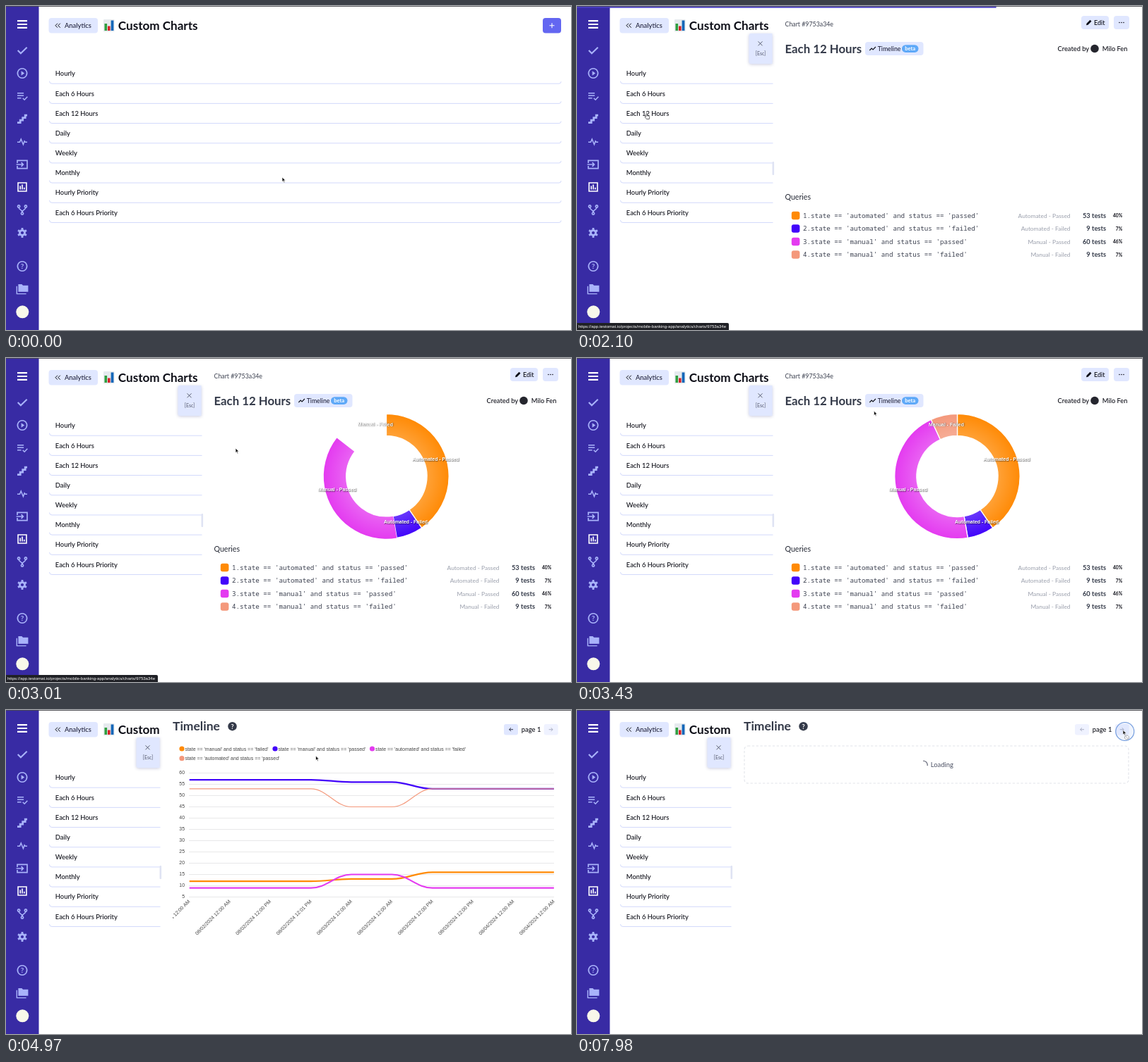
Write an HTML page with a canvas that moves like this. It is 800x460 px and loops after 8 s.

```html
<!DOCTYPE html>
<html lang="en">
<head>
<meta charset="utf-8">
<title>Custom Charts</title>
<style>
html, body { margin: 0; width: 100%; height: 100%; overflow: hidden; background: #fff; }
canvas { display: block; width: 800px; height: 460px; }
</style>
</head>
<body>
<canvas id="stage"></canvas>
<script>
const W = 800, H = 460, LOOP = 8000;
const canvas = document.getElementById('stage');
const ctx = canvas.getContext('2d');
const dpr = window.devicePixelRatio || 1;
canvas.width = W * dpr;
canvas.height = H * dpr;

const UI = 'Lato, "Open Sans", sans-serif';
const ARIAL = '"Liberation Sans", Arial, sans-serif';
const MONO = '"Noto Sans Mono", "DejaVu Sans Mono", monospace';
const INK = '#0e0f18', SLATE = '#343a49', PALE = '#e0e7ff', SIDE = '#382ba4', ICON = '#a9b3fa';
const ORANGE = '#ff8a05', BLUE = '#4205fa', PINK = '#e43bf0', SALMON = '#f4987b';

const clamp = v => Math.max(0, Math.min(1, v));
const span = (t, a, b) => clamp((t - a) / (b - a));
const smooth = p => p * p * (3 - 2 * p);
const outQuart = p => 1 - (1 - p) ** 4;
const mix = (a, b, p) => a + (b - a) * p;

// y is the middle of the capitals
function text(s, x, y, size, color = INK, { font = UI, weight = 400, align = 'left' } = {}) {
  ctx.font = `${weight} ${size}px ${font}`;
  ctx.textAlign = align;
  ctx.fillStyle = color;
  ctx.fillText(s, x, y + size * 0.36);
}
function box(x, y, w, h, r, fill) {
  ctx.beginPath();
  ctx.roundRect(x, y, w, h, r);
  ctx.fillStyle = fill;
  ctx.fill();
}
function disc(x, y, r, fill) {
  ctx.beginPath();
  ctx.arc(x, y, r, 0, 7);
  ctx.fillStyle = fill;
  ctx.fill();
}
function stroke(d, x, y, scale, color, width, fill) {
  const path = new Path2D(d);
  ctx.save();
  ctx.translate(x, y);
  ctx.scale(scale, scale);
  if (fill) { ctx.fillStyle = fill; ctx.fill(path); }
  if (width) {
    ctx.strokeStyle = color;
    ctx.lineWidth = width;
    ctx.stroke(path);
  }
  ctx.restore();
}
const icon = (d, y, color, width, fill) => stroke(d, 23 - 8.4, y - 8.4, 0.7, color, width, fill);

// ---- sidebar ----
const RING = 'M12 2.5a9.5 9.5 0 1 0 .01 0z';
const ICONS = [
  ['M2 5h20M2 12h20M2 19h20', 26, 3, '#fff'],
  ['M3 12l6 6L21.5 6', 63, 3],
  [RING, 95.5, 2.2],
  ['M2 6h13M2 11h13M2 16h8M13 16l3.5 3.5L22.5 13', 128, 2.2],
  ['M2 20h6v-5h5v-5h5V5h4', 160, 4],
  ['M2 13h5l2.5-6 4.5 11 2.5-7 1.5 2h4', 192.5, 2.2],
  ['M2 9V4h20v16H2v-5M0 12h14M10 8l4 4-4 4', 225, 2.4],
  ['M3.5 3.5h17v17h-17zM8 10v7M12 7v10M16 13v4', 257, 2.3, '#fff'],
  ['M5 2.5a2.3 2.3 0 1 0 .01 0zM19 2.5a2.3 2.3 0 1 0 .01 0zM12 17a2.3 2.3 0 1 0 .01 0z' +
   'M5 7c0 5 7 4 7 10M19 7c0 5-7 4-7 10', 289.5, 2.3],
  ['M12 7a5 5 0 1 0 .01 0zM12 2v4M12 18v4M3.5 7l3 1.8M17.5 15.2l3 1.8M3.5 17l3-1.8M17.5 8.8l3-1.8', 322, 4],
  [RING, 369.5, 2.2]
];
function sidebar() {
  ctx.fillStyle = SIDE;
  ctx.fillRect(0, 0, 46.5, H);
  for (const [d, y, width, color] of ICONS) icon(d, y, color || ICON, width);
  icon('M10 7.5l6.5 4.5-6.5 4.5z', 95.5, ICON, 0, ICON);
  icon('M4 2h7l2.5 2.5H24V17.5H4z', 402, ICON, 0, ICON);
  icon('M1 6v15.5h19', 402, ICON, 2);
  text('?', 23, 369.5, 10, ICON, { weight: 700, align: 'center' });
  disc(23.3, 434.3, 9, '#f8f8ea');
}

// ---- list page ----
const ROWS = ['Hourly', 'Each 6 Hours', 'Each 12 Hours', 'Daily', 'Weekly', 'Monthly',
  'Hourly Priority', 'Each 6 Hours Priority'];
function listPage() {
  box(60.5, 17, 69.5, 21.5, 4, PALE);
  stroke('M3.5 0L.5 3l3 3M7.3 0l-3 3 3 3', 69.5, 24.7, 1, INK, 1);
  text('Analytics', 83, 27.6, 9.4, '#20223a', { weight: 500 });

  box(138, 19, 15.5, 17.5, 1, '#e6eaee');
  box(139.5, 25, 3.6, 10, 0, '#2f9e3f');
  box(144, 28.5, 3.6, 6.5, 0, '#d8232a');
  box(148.6, 20.5, 3.8, 14.5, 0, '#1467b8');
  text('Custom Charts', 158.8, 27.6, 17.1, INK, { weight: 700 });

  box(760, 17, 26, 21.5, 4, '#6366f1');
  stroke('M0 3.5h7M3.5 0v7', 769.5, 24.2, 1, '#fff', 1.1);

  ROWS.forEach((name, i) => {
    const y = 96 + i * 28.18;
    text(name, 69.8, y, 9.4, INK, { weight: 500 });
    stroke('M61.5 -3.5q0 3.5 3.5 3.5H783q3 0 3-3', 0, y + 14.2, 1, '#cdd5fb', 0.9);
  });
}

// ---- side panels ----
function openPanel(x, slide, draw) {
  if (slide <= 0) return;
  const dx = (W + 36 - x) * (1 - slide);
  ctx.save();
  ctx.translate(dx, 0);
  ctx.fillStyle = '#fff';
  ctx.fillRect(x, 1, W - x, H);
  ctx.save();
  ctx.shadowColor = 'rgba(60,70,140,.28)';
  ctx.shadowBlur = 4 * dpr;
  ctx.shadowOffsetY = dpr;
  box(x - 34, 39, 33, 43, [3, 0, 0, 3], PALE);
  ctx.restore();
  stroke('M0 0l6 6M6 0l-6 6', x - 21, 50.3, 1, '#4b5063', 0.9);
  text('[Esc]', x - 17.5, 67.3, 7, '#565b6e', { align: 'center' });
  box(x - 1, 221, 2.6, 19, 1, '#dfe3f3');
  draw();
  ctx.restore();
}

const QUERIES = [
  ['Automated', 'Passed', 53, 40, ORANGE],
  ['Automated', 'Failed', 9, 7, BLUE],
  ['Manual', 'Passed', 60, 46, PINK],
  ['Manual', 'Failed', 9, 7, SALMON]
];
const SPOTS = [[608.5, 144], [566, 233], [469, 187], [523, 94.3]];

function donut(t) {
  const cx = 538.5, cy = 168, inner = 57.5, outer = 88.7;
  const sweep = 360 * span(t, 2303, 3131);
  if (!sweep) return;
  let from = 0;
  for (const [, , count, , color] of QUERIES) {
    const to = from + count / 131 * 360;
    const end = Math.min(to, sweep);
    if (end > from) {
      const a = (from - 90) * Math.PI / 180, b = (end - 90) * Math.PI / 180;
      ctx.beginPath();
      ctx.arc(cx, cy, outer, a, b);
      ctx.arc(cx, cy, inner, b, a, true);
      ctx.closePath();
      ctx.fillStyle = color;
      ctx.fill();
      const shade = ctx.createRadialGradient(cx, cy, inner, cx, cy, outer);
      shade.addColorStop(0, 'rgba(255,255,255,.2)');
      shade.addColorStop(1, 'rgba(255,255,255,0)');
      ctx.fillStyle = shade;
      ctx.fill();
      // a slice gets its white border once it is complete
      if (end === to) {
        ctx.strokeStyle = '#fff';
        ctx.lineWidth = 1.3;
        ctx.stroke();
      }
    }
    from = to;
  }
  ctx.save();
  ctx.shadowColor = 'rgba(0,0,0,.65)';
  ctx.shadowBlur = 1.3 * dpr;
  ctx.shadowOffsetX = ctx.shadowOffsetY = 0.7 * dpr;
  QUERIES.forEach(([kind, state], i) =>
    text(`${kind} - ${state}`, ...SPOTS[i], 6.9, '#fff', { font: ARIAL, weight: 700, align: 'center' }));
  ctx.restore();
}

function detail(t) {
  text('Chart #9753a34e', 294.5, 26.3, 8.8, '#3c4150');
  box(714, 14, 39, 19, 4, PALE);
  stroke('M0 8l.6-2.6L5.5.5 7.5 2.5 2.6 7.4z', 721, 19.3, 1, INK, 0, INK);
  text('Edit', 732, 23.5, 9, INK, { weight: 500 });
  box(760, 14, 22, 19, 4, PALE);
  for (const x of [768, 771, 774]) disc(x, 23.5, 0.8, INK);

  text('Each 12 Hours', 294.5, 60.6, 16.8, SLATE, { weight: 700 });
  box(408, 51, 82.5, 19, 4, t > 3440 && t < 4480 ? '#c7d2fe' : PALE);
  stroke('M0 6l2.8-3 2 2L8.600 1', 414.3, 57, 1, INK, 1.1);
  text('Timeline', 425.7, 60.6, 8.7, '#20223a', { weight: 500 });
  box(460, 55.3, 23.5, 10.6, 5.3, '#5ea9f8');
  text('beta', 471.7, 60.4, 7.6, '#fff', { weight: 700, align: 'center' });
  text('Created by', 680.5, 60.5, 9.3, INK, { weight: 500 });
  disc(733, 60.5, 5.8, '#25262e');
  text('Milo Fen', 743.8, 60.5, 9.3, INK, { weight: 500 });

  donut(t);
  text('Queries', 294.5, 270.8, 10.6, '#262a36');
  QUERIES.forEach(([kind, state, count, share, color], i) => {
    const y = 297.5 + i * 18.5;
    box(303.8, y - 5.8, 11.6, 11.6, 3, color);
    text(`${i + 1}.state == '${kind.toLowerCase()}' and status == '${state.toLowerCase()}'`,
      320, y, 9.24, '#3c4150', { font: MONO });
    text(`${kind} - ${state}`, 698.5, y + 0.2, 8.4, '#9a9fac', { align: 'right' });
    text(`${count} tests`, 749, y, 9.3, SLATE, { weight: 700, align: 'right' });
    text(`${share}%`, 772.2, y + 0.5, 6.7, INK, { weight: 700, align: 'right' });
  });
}

// ---- timeline ----
const SERIES = [
  ['manual', 'failed', ORANGE, 249, 55, 2.2],
  ['manual', 'passed', BLUE, 381, 55, 2.2],
  ['automated', 'failed', PINK, 518.5, 55, 2.2],
  ['automated', 'passed', SALMON, 249, 68.7, 1.1]
];
// value per half day
const VALUES = {
  1: [[12, 12, 13, 16, 16], [57, 57, 56, 53, 53], [9, 9, 15, 9, 9], [53, 53, 45, 53, 53]],
  2: [[10, 10, 12, 12, 12], [55, 55, 57, 57, 57], [12, 12, 9, 9, 9], [50, 50, 53, 53, 53]]
};
const px = i => 259.7 + i * 57.35;
const py = v => 89.5 + (60 - v) * 3.2;

function stamp(i, page) {
  const slot = Math.floor(i / 2) - (page - 1) * 5;
  const d = new Date(2024, 7, 2, slot * 12);
  const two = n => String(n).padStart(2, '0');
  const minute = page === 1 && i === 3 ? '01' : '00';
  return `${two(d.getMonth() + 1)}/${two(d.getDate())}/2024 12:${minute} ${d.getHours() ? 'PM' : 'AM'}`;
}

function lineChart(page, rise) {
  for (const [kind, state, color, x, y] of SERIES) {
    disc(x, y, 3.6, color);
    text(`state == '${kind}' and status == '${state}'`, x + 4.4, y + 0.2, 6.97, '#444', { font: ARIAL });
  }
  for (let v = 5; v <= 60; v += 5) {
    ctx.fillStyle = '#e2e2e4';
    ctx.fillRect(259, py(v) - 0.4, 517, 0.8);
    text(v, 253, py(v) - 0.5, 6.9, '#444', { font: ARIAL, align: 'right' });
  }
  ctx.save();
  ctx.beginPath();
  ctx.rect(236, 0, W, H);
  ctx.clip();
  for (let i = 0; i < 10; i++) {
    ctx.save();
    ctx.translate(px(i) - 0.5, 270.5);
    ctx.rotate(-Math.PI / 4);
    text(stamp(i, page), 0, 0, 7.05, '#444', { font: ARIAL, align: 'right' });
    ctx.restore();
  }
  ctx.restore();

  SERIES.forEach(([, , color, , , width], s) => {
    const y = i => mix(py(5), py(VALUES[page][s][Math.floor(i / 2)]), rise);
    ctx.beginPath();
    ctx.moveTo(px(0), y(0));
    for (let i = 1; i < 10; i++)
      ctx.bezierCurveTo(px(i - 0.6), y(i - 1), px(i - 0.4), y(i), px(i), y(i));
    ctx.strokeStyle = color;
    ctx.lineWidth = width;
    ctx.stroke();
  });
}

function loader(t) {
  ctx.beginPath();
  ctx.roundRect(237, 51, 544, 53, 5);
  ctx.setLineDash([3.4, 2.4]);
  ctx.strokeStyle = '#e2e4ea';
  ctx.lineWidth = 1.1;
  ctx.stroke();
  ctx.setLineDash([]);
  const a = (t - 7980) / 1000 * Math.PI * 2;
  ctx.beginPath();
  ctx.arc(490.5, 78, 5.7, a - 1.65, a + 0.2);
  ctx.strokeStyle = '#4b5063';
  ctx.stroke();
  text('Loading', 500.7, 77.2, 9.4, '#4b5063');
}

function pageButton(x, dir, on) {
  box(x - 10, 20, 20, 15.5, 3, on ? PALE : '#eff2ff');
  const d = dir < 0 ? 'M6 3H.6M3 .6L.6 3 3 5.4' : 'M0 3h5.4M3 .6L5.4 3 3 5.4';
  stroke(d, x - 3, 24.7, 1, on ? '#20223a' : '#a3a7bd', 0.9);
}

const LOADS = [[0, 4540, 1], [6450, 6690, 2], [7870, LOOP, 1]];
function timeline(t) {
  const [, ready, page] = LOADS.filter(l => t >= l[0]).pop();
  const loading = t < ready;
  text('Timeline', 236, 23, 17.5, SLATE, { weight: 700 });
  disc(320.5, 23.2, 6.2, SLATE);
  text('?', 320.5, 23.3, 9, '#fff', { weight: 700, align: 'center' });
  pageButton(715, -1, !loading);
  text(`page ${page}`, 729.8, 27.6, 9.4, INK, { weight: 500 });
  pageButton(771.7, 1, !loading && page > 1);
  if (loading) loader(t);
  else lineChart(page, outQuart(span(t, ready, ready + 430)));
}

// ---- overlays ----
function progress(t) {
  ctx.fillStyle = '#4a4a4e';
  ctx.fillRect(0, 0, W, 0.9);
  if (t < 1540 || t > 2600) return;
  const w = t < 2450 ? 696 * (1 - (1 - span(t, 1540, 2450)) ** 2) : mix(696, W, span(t, 2450, 2600));
  ctx.fillStyle = '#4a3fc4';
  ctx.fillRect(0, 0.9, w, 1.8);
}
function statusBar(t) {
  ctx.globalAlpha = Math.min(span(t, 960, 1120), 1 - span(t, 3130, 3330));
  if (ctx.globalAlpha) {
    box(-4, 450, 219, 14, 2, '#202126');
    text('https://app.testomat.io/projects/mobile-banking-app/analytics/charts/9753a34e',
      2, 455.2, 6.05, '#fff', { font: ARIAL });
  }
  ctx.globalAlpha = 1;
}

// start, end, x, y
const MOVES = [[0, 0, 391, 243], [250, 840, 98.8, 152.5], [2500, 3010, 325, 128],
  [3050, 3560, 438.5, 65], [5270, 5950, 715, 28.5], [7150, 7490, 773, 28.5]];
const HAND = [[740, 2600], [3440, 4480], [5870, 6450], [7410, 7870]];
const DENIED = [[6450, 6690], [7870, LOOP]];
const CLICKS = [1480, 4230, 6370, 7780];
const within = (list, t) => list.some(([a, b]) => t >= a && t < b);

function pointer(t) {
  let x = 0, y = 0;
  for (const [a, b, tx, ty] of MOVES) {
    if (t < a) break;
    const p = a === b ? 1 : smooth(span(t, a, b));
    x = mix(x, tx, p);
    y = mix(y, ty, p);
  }
  for (const c of CLICKS) {
    const age = t - c;
    if (age < 0 || age > 260) continue;
    ctx.beginPath();
    ctx.arc(x + 2.8, y + 2, mix(6, 13, outQuart(clamp(age / 140))), 0, 7);
    ctx.fillStyle = 'rgba(120,165,235,.12)';
    ctx.fill();
    ctx.strokeStyle = '#6c97dc';
    ctx.lineWidth = 1.1;
    ctx.stroke();
  }
  if (within(HAND, t)) {
    stroke('M-1 .8a.8.8 0 0 1 1.6 0v2.4l2.4.5c.8.2 1 .7.9 1.4l-.4 2.9h-3.8' +
      'l-2.5-3.3c.3-.7 1-.6 1.8.1z', x, y, 1, '#2b2b30', 0.7, '#fff');
    return;
  }
  stroke('M0 0v6.6l1.5-1.4 1.1 2.5 1.1-.5-1.1-2.4h2.2z', x, y, 1, '#fff', 0.7, '#111');
  if (within(DENIED, t))
    stroke('M5.5 7.5a3 3 0 1 0 .01 0zM3.4 8.4l4.2 4.2', x, y, 1, '#9a9ca3', 0.9, '#fff');
}

function frame(now) {
  const t = now % LOOP;
  ctx.setTransform(dpr, 0, 0, dpr, 0, 0);
  ctx.fillStyle = '#fff';
  ctx.fillRect(0, 0, W, H);
  listPage();
  openPanel(277.5, outQuart(span(t, 1680, 2000)), () => detail(t));
  openPanel(218.5, outQuart(span(t, 4320, 4620)), () => timeline(t));
  sidebar();
  progress(t);
  statusBar(t);
  pointer(t);
}

const begin = performance.now();
function tick() {
  frame(performance.now() - begin);
  requestAnimationFrame(tick);
}
tick();
</script>
</body>
</html>
```
